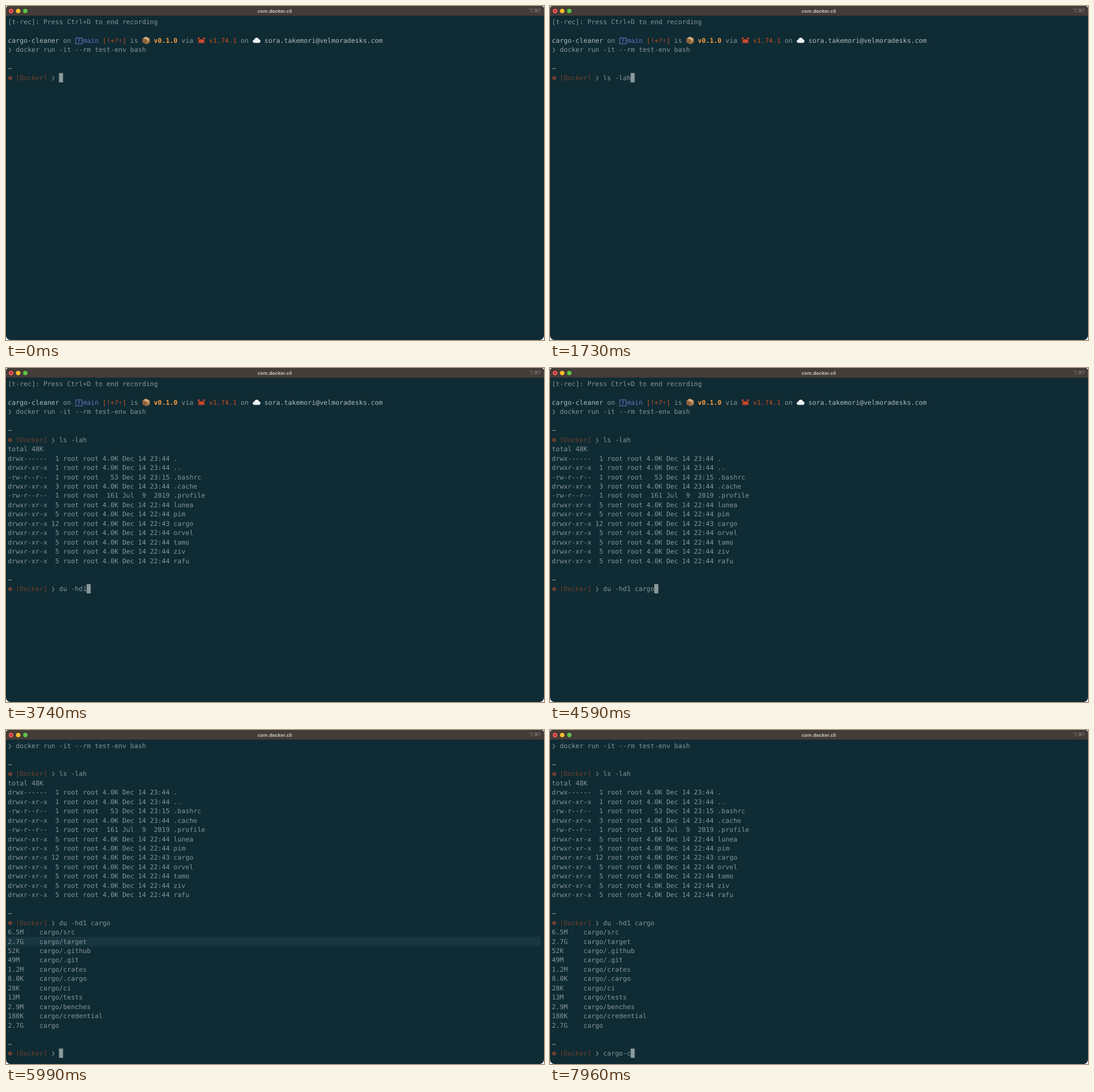
An HTML page with a canvas that plays this animation: 949 px wide and 590 px high, repeating every 8000 ms.

```html
<!DOCTYPE html>
<html lang="en">
<head>
<meta charset="utf-8">
<title>Terminal</title>
<style>
html, body { margin: 0; width: 100%; height: 100%; overflow: hidden; background: #fff; }
canvas { display: block; width: 949px; height: 590px; }
</style>
</head>
<body>
<canvas id="stage" width="949" height="590"></canvas>
<script>
const ctx = document.getElementById('stage').getContext('2d');
const W = 949, H = 590, LOOP = 8000;
const LEFT = 3.3, TOP = 19.8, CELL = 6.96, ROW = 16.4545, BASE = 12.2;
const MONO = '"DejaVu Sans Mono", "Noto Sans Mono", monospace';
const C = {
  back: '#0f2b34', bar: '#443c38', band: '#183640', text: '#869697', bold: '#b0bbbb',
  dim: '#64787d', violet: '#6c71c4', amber: '#f59a3e', rust: '#c9501f', docker: '#6c402c',
  cursor: '#8b9a9b'
};

// [time, characters typed] for each command
const LS = { text: 'ls -lah', keys: [[280, 1], [570, 2], [860, 3], [1150, 4], [1440, 6], [1730, 7]] };
const DU = { text: 'du -hd1 cargo', keys: [[2320, 1], [2600, 3], [2880, 4], [3170, 5], [3450, 6],
  [3740, 7], [4020, 9], [4310, 11], [4590, 13]] };
const CLEAN = { text: 'cargo-c', keys: [[6550, 1], [6820, 2], [7100, 3], [7380, 5], [7670, 6], [7960, 7]] };
const LS_DONE = 2030, DU_DONE = 4880, BAND_ON = 5430, BAND_OFF = 6550;

const entry = (links, size, date, name, mode = 'drwxr-xr-x') =>
  `${mode} ${String(links).padStart(2)} root root ${size.padStart(4)} ${date} ${name}`;
const folder = name => entry(5, '4.0K', 'Dec 14 22:44', name);
const listing = [
  'total 48K',
  entry(1, '4.0K', 'Dec 14 23:44', '.', 'drwx------'),
  entry(1, '4.0K', 'Dec 14 23:44', '..'),
  entry(1, '53', 'Dec 14 23:15', '.bashrc', '-rw-r--r--'),
  entry(3, '4.0K', 'Dec 14 23:44', '.cache'),
  entry(1, '161', 'Jul  9  2019', '.profile', '-rw-r--r--'),
  folder('lunea'), folder('pim'),
  entry(12, '4.0K', 'Dec 14 22:43', 'cargo'),
  folder('orvel'), folder('tamo'), folder('ziv'), folder('rafu')
];
const usage = ['6.5M /src', '2.7G /target', '52K /.github', '49M /.git', '1.2M /crates', '8.0K /.cargo',
  '28K /ci', '13M /tests', '2.9M /benches', '180K /credential', '2.7G ']
  .map(s => { const [size, dir] = s.split(' '); return size.padEnd(8) + 'cargo' + dir; });

const colX = col => LEFT + col * CELL;
const rowY = row => TOP + row * ROW;

function put(text, col, row, color = C.text, weight = 400) {
  ctx.font = `${weight} 11.56px ${MONO}`;
  ctx.fillStyle = color;
  [...text].forEach((ch, i) => {
    if (ch !== ' ') ctx.fillText(ch, colX(col + i), rowY(row) + BASE);
  });
}

function shape(color, points) {
  ctx.fillStyle = color;
  ctx.beginPath();
  points.forEach(([x, y]) => ctx.lineTo(x, y));
  ctx.fill();
}

function disc(x, y, r, color) {
  ctx.fillStyle = color;
  ctx.beginPath();
  ctx.arc(x, y, r, 0, Math.PI * 2);
  ctx.fill();
}

function at(x, y, draw) {
  ctx.save();
  ctx.translate(x, y);
  draw();
  ctx.restore();
}

function parcel() {
  shape('#b98a5a', [[-6.5, -3.5], [0, -6.7], [6.5, -3.5], [0, -0.5]]);
  shape('#8d623b', [[-6.5, -3.5], [0, -0.5], [0, 7], [-6.5, 3.6]]);
  shape('#a67647', [[6.5, -3.5], [0, -0.5], [0, 7], [6.5, 3.6]]);
  shape('#e0c49a', [[-4, -4.8], [-2, -5.8], [4.5, -2.6], [4.5, 0.2], [2.5, 1], [2.5, -1.6]]);
}

function crab() {
  const shell = '#c9482c';
  ctx.strokeStyle = '#a83a24';
  ctx.lineWidth = 1.2;
  ctx.beginPath();
  for (const s of [-1, 1]) {
    for (const y of [1, 3, 5]) {
      ctx.moveTo(s * 3, y - 1);
      ctx.lineTo(s * 6.2, y);
    }
    ctx.moveTo(s * 4, 0);
    ctx.lineTo(s * 5.5, -3);
  }
  ctx.stroke();
  disc(-4.6, -3.8, 1.8, shell);
  disc(4.6, -3.8, 1.8, shell);
  ctx.fillStyle = shell;
  ctx.beginPath();
  ctx.ellipse(0, 1.2, 4.8, 3.6, 0, 0, Math.PI * 2);
  ctx.fill();
  disc(-1.6, -2.6, 0.9, '#3a1a18');
  disc(1.6, -2.6, 0.9, '#3a1a18');
}

function cloud() {
  disc(-3.7, 1.4, 3, '#e3e9ed');
  disc(3.8, 1.3, 3.1, '#e3e9ed');
  disc(0.2, -0.8, 3.9, '#f3f6f8');
  ctx.fillStyle = '#e9eef1';
  ctx.fillRect(-4, 1, 8, 3.4);
}

function intro() {
  put('[t-rec]: Press Ctrl+D to end recording', 0, 0);
  put('cargo-cleaner', 0, 2, C.bold);
  put('on', 14, 2);
  ctx.strokeStyle = C.violet;
  ctx.lineWidth = 1.1;
  ctx.strokeRect(123, 56.3, 11, 10.6);
  ctx.font = `700 9px ${MONO}`;
  ctx.fillStyle = C.violet;
  ctx.fillText('?', 125.8, 65);
  put('main', 19, 2, C.violet);
  put('[!+?⇡]', 24, 2, C.rust);
  put('is', 31, 2);
  at(247.2, 60.8, parcel);
  put('v0.1.0', 37, 2, C.amber, 700);
  put('via', 44, 2);
  at(344.6, 60.8, crab);
  put('v1.74.1', 51, 2, C.rust);
  put('on', 59, 2);
  at(442, 60.8, cloud);
  put('sora.takemori@velmoradesks.com', 65, 2, C.bold);
}

// Prompt with its command; the cursor shows while it is being typed
function prompt(row, cmd, t, active) {
  put('~', 0, row - 1, C.bold);
  const y = rowY(row) + 8.6;
  shape(C.docker, [0, 1, 2, 3, 4, 5].map(i => {
    const a = (i + 0.5) * Math.PI / 3;
    return [7.4 + 4 * Math.cos(a), y + 4 * Math.sin(a)];
  }));
  put('[Docker]', 2, row, C.docker);
  put('❯', 11, row, C.dim);
  let n = 0;
  for (const [time, count] of cmd.keys) if (t >= time) n = count;
  put(cmd.text.slice(0, n), 13, row);
  if (active) {
    ctx.fillStyle = C.cursor;
    ctx.fillRect(colX(13 + n) - 0.3, rowY(row) - 0.1, CELL + 0.2, ROW);
  }
}

function titleBar() {
  ctx.fillStyle = C.bar;
  ctx.fillRect(0, 0, W, 17);
  ['#fc5b57', '#f8bd30', '#5ac544'].forEach((color, i) => disc(8.9 + i * 12.6, 8.8, 3.9, color));
  disc(8.9, 8.8, 1.4, '#7b1512');
  ctx.fillStyle = '#c5bfbb';
  ctx.font = '700 8.4px Inter, sans-serif';
  ctx.textAlign = 'center';
  ctx.fillText('com.docker.cli', 474, 11.5);
  ctx.fillStyle = '#8d8681';
  ctx.font = '400 8.6px Inter, "DejaVu Sans", sans-serif';
  ctx.textAlign = 'right';
  ctx.fillText('⌥⌘1', 943, 11.4);
  ctx.textAlign = 'left';
}

function draw(t) {
  const scroll = t >= DU_DONE ? 3 : 0;
  ctx.textRendering = 'geometricPrecision';
  ctx.fillStyle = '#fff';
  ctx.fillRect(0, 0, W, H);
  ctx.save();
  ctx.beginPath();
  ctx.roundRect(0, 0, W, H, [5, 5, 8, 8]);
  ctx.clip();
  ctx.fillStyle = C.back;
  ctx.fillRect(0, 0, W, H);
  if (t >= BAND_ON && t < BAND_OFF) {
    ctx.fillStyle = C.band;
    ctx.fillRect(0, rowY(21), 943, ROW);
  }
  if (!scroll) intro();
  put('❯', 0, 3 - scroll, C.dim);
  put('docker run -it --rm test-env bash', 2, 3 - scroll);
  prompt(6 - scroll, LS, t, t < LS_DONE);
  if (t >= LS_DONE) {
    listing.forEach((line, i) => put(line, 0, 7 + i - scroll));
    prompt(22 - scroll, DU, t, !scroll);
  }
  if (scroll) {
    usage.forEach((line, i) => put(line, 0, 20 + i));
    prompt(33, CLEAN, t, true);
  }
  titleBar();
  ctx.restore();
}

const start = performance.now();
function tick() {
  draw((performance.now() - start) % LOOP);
  requestAnimationFrame(tick);
}
tick();
</script>
</body>
</html>
```
